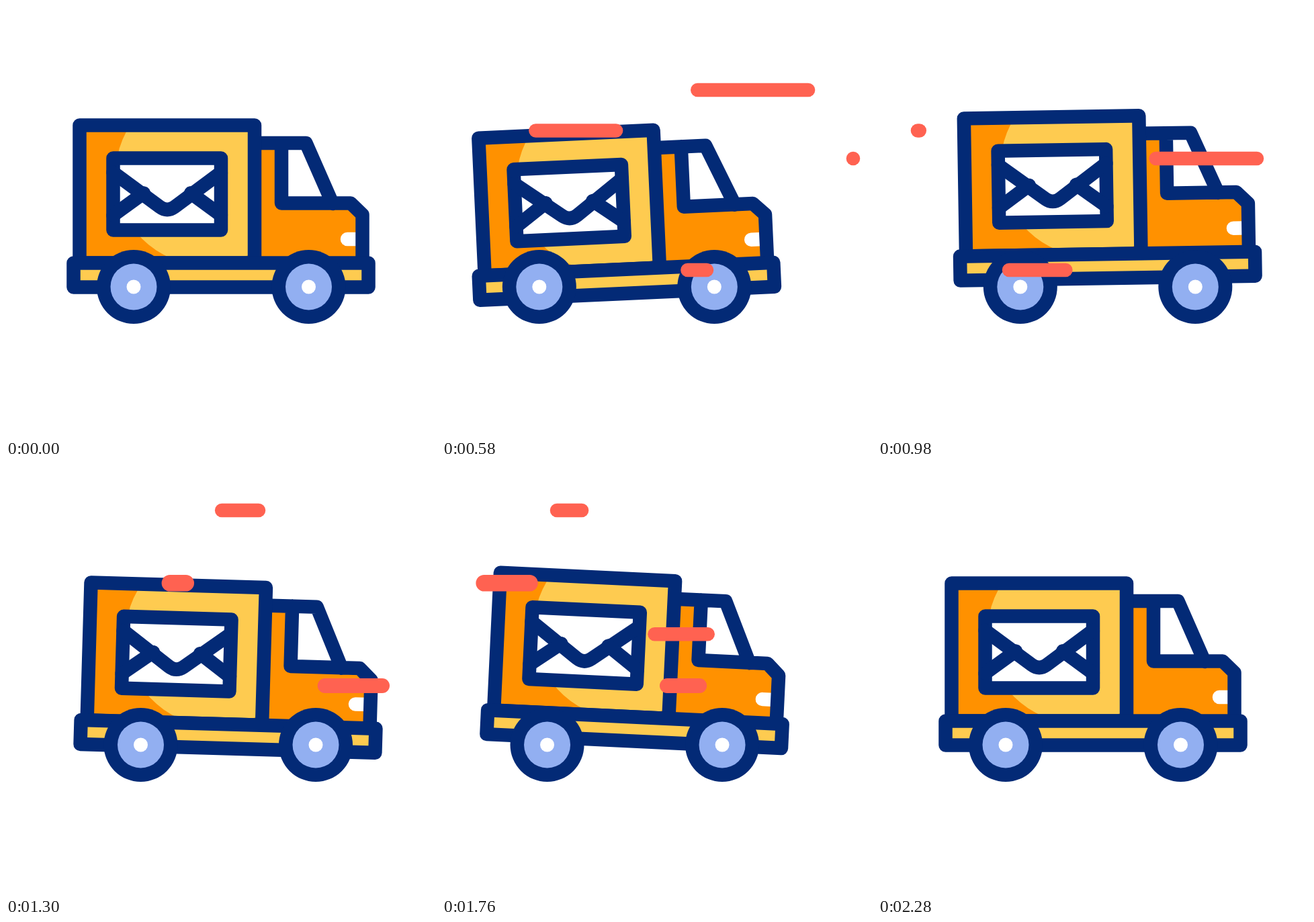
An HTML page with a canvas that plays this animation: 640x640 px, repeating every 2400 ms.

```html
<!DOCTYPE html>
<html lang="en">
<head>
<meta charset="utf-8">
<title>Mail truck</title>
<style>
  html, body { margin: 0; width: 100%; height: 100%; overflow: hidden; background: #fff; }
  canvas { display: block; width: 640px; height: 640px; }
</style>
</head>
<body>
<canvas id="stage" width="640" height="640"></canvas>
<script>
const ctx = document.getElementById('stage').getContext('2d');
const LOOP = 2400;
const NAVY = '#032a76', ORANGE = '#ff9100', YELLOW = '#fecb50';
const BLUE = '#92aff1', RED = '#ff6251', WHITE = '#fff';
const STROKE = 20.5;

// Keys are [time in ms, value], eased between neighbours.
const driveKeys = [[0, 0], [600, -45.3], [1100, 33], [1640, -39], [2150, 0]];
const bounceKeys = [[0, 0], [500, 11], [1000, -13.5], [1375, 7], [1880, -8], [2280, 0]];
const tiltKeys = [[0, 0], [600, -2.63], [1650, 3.15], [2135, 0]];

const streaks = [
  { y: 125, x: 557, length: 205, start: 236, duration: 450, lag: 279 },
  { y: 185.5, x: 264, length: 205, start: 308, duration: 477, lag: 229 },
  { y: 393, x: 394, length: 210, start: 434, duration: 635, lag: 210 },
  { y: 227, x: 612, length: 205, start: 575, duration: 455, lag: 263 },
  { y: 330, x: 560, length: 225, start: 1026, duration: 657, lag: 274, width: 22 },
  { y: 69, x: 376, length: 205, start: 1142, duration: 468, lag: 278 },
  { y: 177.3, x: 267.7, length: 205, start: 1204, duration: 457, lag: 276, width: 24.6 },
  { y: 253.3, x: 476, length: 205, start: 1302, duration: 660, lag: 177 }
];

function ease(u) {
  u = Math.min(1, Math.max(0, u));
  return u * u * (3 - 2 * u);
}

function valueAt(keys, t) {
  const next = keys.findIndex(key => key[0] > t);
  if (next < 0) return keys[keys.length - 1][1];
  const [t0, v0] = keys[next - 1], [t1, v1] = keys[next];
  return v0 + (v1 - v0) * ease((t - t0) / (t1 - t0));
}

function shape(path, fill, stroke) {
  const p = new Path2D(path);
  if (fill) { ctx.fillStyle = fill; ctx.fill(p); }
  if (stroke) { ctx.strokeStyle = stroke; ctx.stroke(p); }
}

function disc(x, y, r, color) {
  ctx.fillStyle = color;
  ctx.beginPath();
  ctx.arc(x, y, r, 0, Math.PI * 2);
  ctx.fill();
}

function drawCab() {
  shape('M370 204H410V293.5H513L530.5 311V382.5H370Z', ORANGE);
  shape('M410 204H446.5L486 293.5H410Z', WHITE);
  shape('M508 347H530', null, WHITE);
  shape('M370 204H446.5L486 294M410 204V293.5H513L530.5 310.5V382.5', null, NAVY);
}

function drawBox() {
  const box = 'M109.5 177.5H370V382.5H109.5Z';
  shape(box, ORANGE);
  ctx.save();
  ctx.clip(new Path2D(box));
  disc(298, 251, 135, YELLOW);
  ctx.restore();
  shape(box, null, NAVY);
}

function drawEnvelope() {
  shape('M159.5 226.5H320V333.5H159.5Z', WHITE, NAVY);
  shape('M159.5 247.7L229 299Q240 307 251 299L320 247.7', null, NAVY);
  shape('M159.5 311.5L205 278.5M320 311.5L275 278.5', null, NAVY);
}

function drawBody(drive, t) {
  ctx.save();
  ctx.translate(320 + drive, 400.5 + valueAt(bounceKeys, t));
  ctx.rotate(valueAt(tiltKeys, t) * Math.PI / 180);
  ctx.translate(-320, -400.5);
  drawCab();
  drawBox();
  drawEnvelope();
  shape('M100.5 382.5H539.5V418.5H100.5Z', YELLOW, NAVY);
  ctx.restore();
}

function drawWheel(x) {
  disc(x, 418, 55, NAVY);
  disc(x, 418, 34.5, BLUE);
  disc(x, 418, 10.5, WHITE);
}

function drawStreak(s, t) {
  const age = t - s.start;
  if (age < 0 || age > s.duration + s.lag) return;
  const head = s.x - s.length * ease(age / s.duration);
  const tail = s.x - s.length * ease((age - s.lag) / s.duration);
  ctx.lineWidth = s.width || STROKE;
  ctx.strokeStyle = RED;
  ctx.beginPath();
  ctx.moveTo(head, s.y);
  ctx.lineTo(Math.max(tail, head + 0.01), s.y);
  ctx.stroke();
}

function draw() {
  const t = performance.now() % LOOP;
  const drive = valueAt(driveKeys, t);
  ctx.fillStyle = WHITE;
  ctx.fillRect(0, 0, 640, 640);
  ctx.lineCap = ctx.lineJoin = 'round';
  ctx.lineWidth = STROKE;
  drawBody(drive, t);
  drawWheel(190 + drive);
  drawWheel(450.5 + drive);
  streaks.forEach(s => drawStreak(s, t));
  requestAnimationFrame(draw);
}

draw();
</script>
</body>
</html>
```
